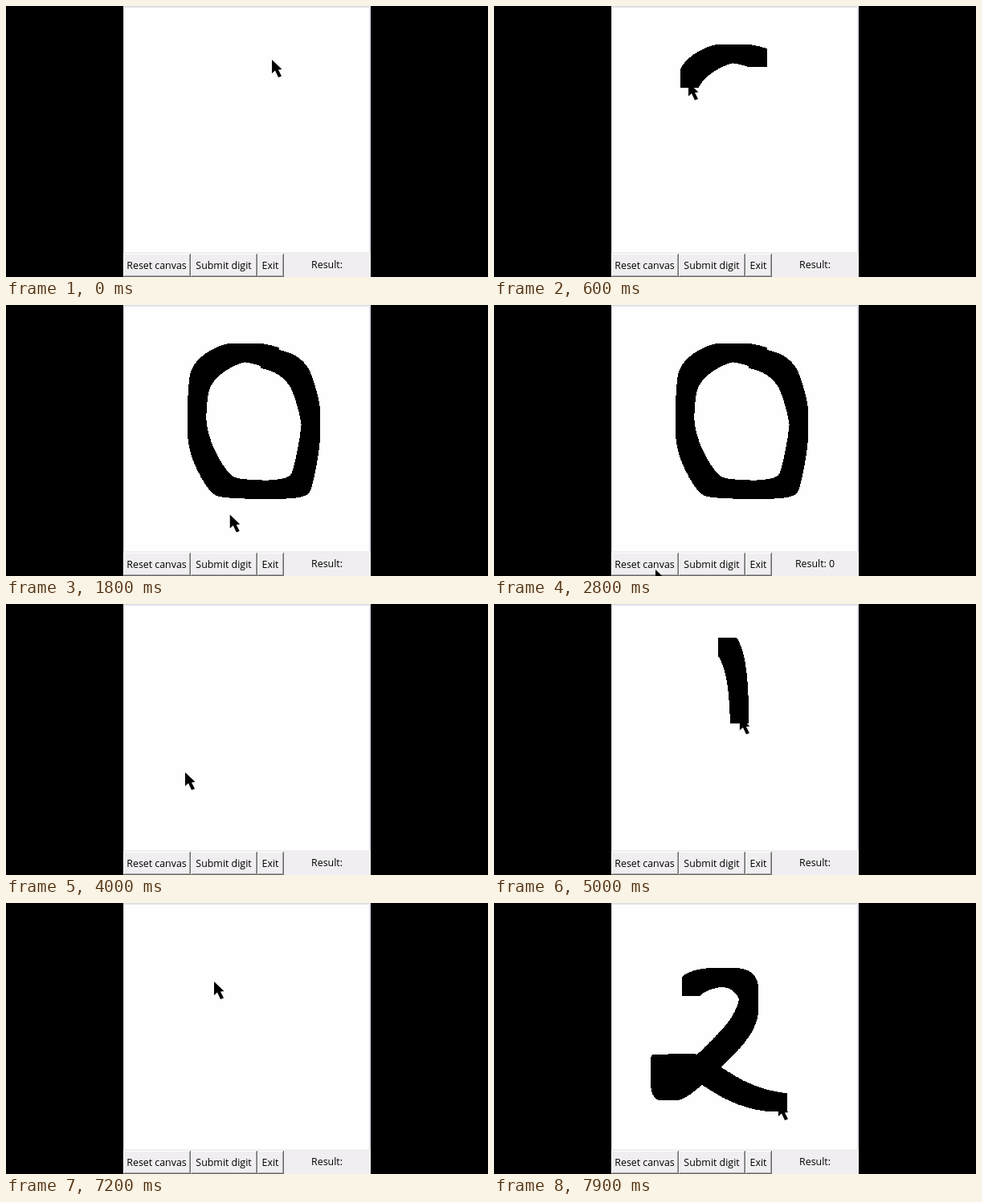
An HTML page with a canvas that plays this animation: 600 px wide and 338 px high, repeating every 8 s.

```html
<!DOCTYPE html>
<html lang="en">
<head>
<meta charset="utf-8">
<title>Digit pad</title>
<style>
  html, body { margin: 0; width: 100%; height: 100%; overflow: hidden; background: #000; }
  canvas { display: block; }
</style>
</head>
<body>
<canvas id="stage" width="600" height="338"></canvas>
<script>
const ctx = document.getElementById('stage').getContext('2d');
const LOOP = 8000, STEP = 100, BRUSH = 23, LEAD = 0.012;
const FACE = '#f0eef0', SHADE = '#696969', EDGE = '#dfdfe7';

// Pointer moves in order of time; strokes also leave paint until they are wiped.
const moves = [];
let place = [331, 67];

function glide(from, to, x, y) {
  const target = [x, y];
  // A doubled end point makes the curve ease out.
  moves.push({ from, to, points: [place, target, target] });
  place = target;
}

function stroke(from, to, wiped, points) {
  moves.push({ from, to, wiped, points });
  place = points[points.length - 1];
}

glide(0, 100, 330, 65);
stroke(400, 1300, 3600, [
  [328.5, 65], [312, 59.5], [280, 59.5], [243, 84], [238, 120], [238, 172], [265, 224],
  [285, 230.5], [363, 231], [371, 214], [381, 158], [379, 128], [361, 74], [329, 68]
]);
glide(1500, 2100, 262, 326);
glide(2500, 2800, 201, 330);
glide(3700, 4000, 223, 210);
glide(4000, 4600, 291, 54);
stroke(4850, 5100, 6800, [[291, 54], [299, 66], [306, 115], [306, 190], [307.5, 224.5]]);
glide(5200, 5700, 261, 327);
glide(6100, 6400, 188, 327);
glide(6800, 7200, 259, 98);
glide(7200, 7300, 246, 104);
stroke(7350, 7900, LOOP, [
  [245.5, 104.5], [258, 93], [317.5, 93], [319, 145], [267, 200], [222, 238], [207.5, 230],
  [206, 196], [222, 212], [228, 198], [249, 202], [318, 246], [354, 249]
]);

const buttons = [
  { label: 'Reset canvas', x: 146, w: 84, presses: [3500, 6700] },
  { label: 'Submit digit', x: 230, w: 83, presses: [2100, 5800] },
  { label: 'Exit', x: 313, w: 33, presses: [] }
];

const results = [
  { from: 2200, to: 3600, digit: 0 },
  { from: 5900, to: 6800, digit: 1 }
];

function rect(color, x, y, w, h) {
  ctx.fillStyle = color;
  ctx.fillRect(x, y, w, h);
}

function text(label, x, y) {
  ctx.fillStyle = '#000';
  ctx.fillText(label, x, y);
}

// Point at k = 0..1 on the quadratic spline guided by the given points.
function curve(points, k) {
  const count = points.length - 2;
  const u = Math.min(Math.max(k, 0), 1) * count;
  const i = Math.min(Math.floor(u), count - 1), f = u - i;
  const [a, b, c] = points.slice(i, i + 3);
  return [0, 1].map(axis => {
    const start = i === 0 ? a[axis] : (a[axis] + b[axis]) / 2;
    const end = i === count - 1 ? c[axis] : (b[axis] + c[axis]) / 2;
    return start * (1 - f) ** 2 + 2 * b[axis] * f * (1 - f) + end * f * f;
  });
}

const progress = (move, t) => Math.min((t - move.from) / (move.to - move.from), 1);

function drawStroke(move, t) {
  if (t < move.from || t >= move.wiped) return;
  const done = progress(move, t);
  for (let i = 0; i <= done * 1000; i++) {
    const [x, y] = curve(move.points, i / 1000);
    rect('#000', Math.floor(x - BRUSH / 2), Math.floor(y - BRUSH / 2), BRUSH, BRUSH);
  }
}

function drawButton({ label, x, w, presses }, t) {
  const down = presses.some(p => t >= p && t < p + STEP);
  const top = 309, h = 29, shift = down ? 1 : 0;
  rect(down ? '#fff' : SHADE, x, top, w, h);
  rect(down ? SHADE : '#fff', x, top, w - 1, h - 1);
  rect('#a5a4a6', x + 1, top + 1, w - 2, h - 2);
  rect(FACE, x + 1, top + 1, w - 3, h - 3);
  text(label, x + w / 2 - 0.5 + shift, 328 + shift);
}

function drawPointer(t) {
  const move = moves.filter(m => m.from <= t).pop();
  const [x, y] = curve(move.points, progress(move, t) + (move.wiped ? LEAD : 0));
  const outline = [[0, 0], [0, 17], [4, 13.5], [8, 22], [12, 20.5], [8, 12.5], [12.5, 12]];
  ctx.fillStyle = '#000';
  ctx.beginPath();
  for (const [dx, dy] of outline) ctx.lineTo(x + dx, y + dy);
  ctx.fill();
}

function draw(t) {
  rect('#000', 0, 0, 600, 338);
  rect(FACE, 146, 0, 308, 338);
  rect(EDGE, 146, 0, 308, 307);
  rect('#fefefe', 147, 2, 305, 305);
  ctx.font = '12.4px "Open Sans", "Noto Sans", sans-serif';
  ctx.textAlign = 'center';
  for (const move of moves) if (move.wiped) drawStroke(move, t);
  for (const button of buttons) drawButton(button, t);
  const result = results.find(({ from, to }) => t >= from && t < to);
  text(result ? 'Result: ' + result.digit : 'Result:', 399.5, 327);
  drawPointer(t);
}

const start = performance.now();
function tick() {
  const t = (performance.now() - start) % LOOP;
  draw(Math.floor(t / STEP) * STEP);
  requestAnimationFrame(tick);
}
tick();
</script>
</body>
</html>
```
